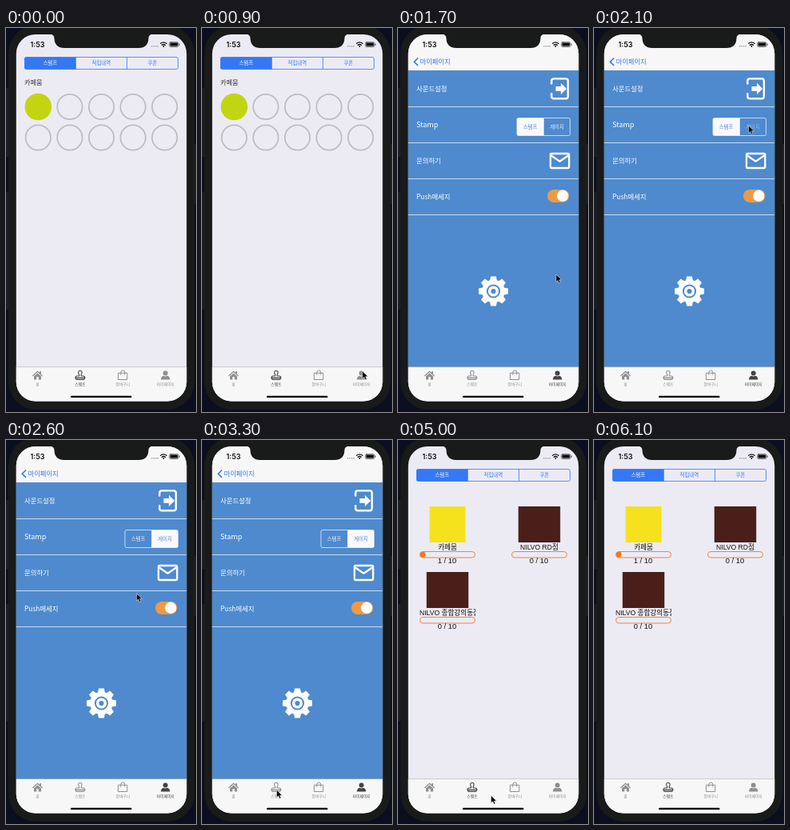
Animation of 238x480 px, one loop 6200 ms. Source, as an HTML page:

```html
<!DOCTYPE html>
<html lang="ko">
<head>
<meta charset="utf-8">
<title>Stamp app</title>
<style>
html, body { margin: 0; width: 100%; height: 100%; overflow: hidden; background: #0b0e1e; }
svg { display: block; width: 238px; height: 480px; }
text { font-family: "Noto Sans CJK KR", "Noto Sans CJK", "Noto Sans", sans-serif; }
.latin { font-family: "Liberation Sans", "Noto Sans CJK KR", sans-serif; }
.mid { text-anchor: middle; }
.line { fill: none; stroke: currentColor; stroke-linejoin: round; stroke-linecap: round; }
</style>
</head>
<body>
<svg viewBox="0 0 238 480">
  <defs>
    <clipPath id="screen"><rect x="12.800" y="8" width="213.400" height="458.600" rx="24"/></clipPath>
    <clipPath id="label"><rect x="27" y="208" width="70" height="14"/></clipPath>
  </defs>

  <rect width="238" height="480" fill="#0b0e1e"/>
  <path d="M0 75h4v86H0zM0 205h4v147H0zM234 145h4v75h-4z" fill="#1b1e29"/>
  <rect x="3" y="-3" width="233" height="480" rx="34" fill="#191a1a"/>

  <g clip-path="url(#screen)">
    <rect x="12" y="8" width="215" height="460" fill="#ecebf4"/>

    <g id="stampTop"></g>
    <g id="stamps"></g>
    <g id="gauges"></g>

    <g id="settings">
      <rect x="12" y="8" width="215" height="45" fill="#f7f7f8"/>
      <path d="M25 37.5l-4.7 4.7 4.7 4.7" fill="none" stroke="#3478f6" stroke-width="1.6"/>
      <text x="27.5" y="45.2" font-size="8.3" fill="#3478f6">마이페이지</text>
      <rect x="12" y="53" width="215" height="371" fill="#4e8acd"/>
      <path d="M12 98.5h215M12 143.5h215M12 188.5h215M12 233.5h215" stroke="#c9dcf1"/>
      <g font-size="8.4" fill="#fff">
        <text x="23" y="79">사운드설정</text>
        <text x="23" y="124" font-size="9">Stamp</text>
        <text x="23" y="169">문의하기</text>
        <text x="23" y="214">Push메세지</text>
      </g>
      <g color="#fff">
        <path class="line" stroke-width="2.4" d="M192.3 69.5v-3.3q0-2.8 2.8-2.8h15q2.8 0 2.8 2.8v19.3q0 2.8-2.8 2.8h-15q-2.8 0-2.8-2.8v-3.3"/>
        <path fill="#fff" d="M197.5 73h6.5v-4.3l7.2 7.2-7.2 7.2v-4.3h-6.5z"/>
        <rect class="line" stroke-width="2.3" x="191" y="157" width="23.3" height="18" rx="1.5"/>
        <path class="line" stroke-width="2.3" d="M192 159.5l10.6 7.2 10.6-7.2"/>
      </g>
      <rect x="187" y="202" width="27.5" height="16" rx="8" fill="#ef9a43"/>
      <circle cx="206.3" cy="210.3" r="7.5" fill="#3c6da8" opacity=".3"/>
      <circle cx="206.3" cy="209.8" r="7.2" fill="#fff"/>
      <g id="modeSwitch">
        <path id="left" d="M182.5 112.5h-31.5q-2 0-2 2v18q0 2 2 2h31.5z" fill="#faf8fd"/>
        <path id="right" d="M182.5 112.5h31q2 0 2 2v18q0 2-2 2h-31z" fill="#faf8fd"/>
        <rect x="149" y="112.5" width="66.5" height="22" rx="2" fill="none" stroke="#e4edf8" stroke-width=".8"/>
        <path d="M182.5 112.5v22" stroke="#e4edf8" stroke-width=".8"/>
        <text id="leftText" class="mid" x="165.5" y="126" font-size="6.4">스탬프</text>
        <text id="rightText" class="mid" x="199" y="126" font-size="6.4">게이지</text>
      </g>
      <g id="gear" transform="translate(119.5 329)">
        <circle r="14.3" fill="#fff"/>
        <circle r="7.6" fill="none" stroke="#4e8acd" stroke-width="2"/>
        <circle r="3.1" fill="#4e8acd"/>
      </g>
    </g>

    <rect x="12" y="424" width="215" height="44" fill="#f7f7f8"/>
    <path d="M12 423.7h215" stroke="#bcbcc2" stroke-width=".7"/>
    <g id="tabs"></g>
    <rect x="81" y="459.7" width="76.5" height="2.4" rx="1.2" fill="#050505"/>

    <text x="30.5" y="24" font-size="9" font-weight="600" fill="#111" style="font-family:Inter,sans-serif">1:53</text>
    <path d="M182 22.8h9" stroke="#a0a0a6" stroke-width="1.4" stroke-dasharray="1.4 1.1"/>
    <g color="#111">
      <path class="line" stroke-width="1.3" d="M193.7 19.3q3.7-3 7.4 0M195.3 21.3q2.1-1.6 4.2 0"/>
      <circle cx="197.4" cy="22.9" r=".9"/>
      <rect class="line" x="204.7" y="17.7" width="11.3" height="5.8" rx="1.6" stroke-width=".6"/>
      <rect x="205.6" y="18.6" width="9.5" height="4" rx=".8"/>
      <path d="M217 19.6v2" stroke="#111" stroke-width=".8"/>
    </g>
  </g>
  <path d="M55 7.5Q60.5 8 60.5 13Q61 25 73 25H166Q178 25 178.5 13Q178.5 8 184 7.5Z" fill="#191a1a"/>

  <path id="cursor" d="M0 0v9.3l2.2-2 1.5 3.5 1.7-.7-1.5-3.4h3z" fill="#000" stroke="#fff" stroke-width=".5"/>
</svg>

<script>
const LOOP = 6200, STEP = 100;
const BLUE = '#3478f6';
const $ = id => document.getElementById(id);
const clamp = v => Math.max(0, Math.min(1, v));
const ease = v => v * v * (3 - 2 * v);
const ramp = (t, a, b) => ease(clamp((t - a) / (b - a)));
const show = (id, on) => $(id).setAttribute('display', on ? 'inline' : 'none');
const label = (x, y, size, fill, str, extra = 'class="mid"') =>
  `<text x="${x}" y="${y}" font-size="${size}" fill="${fill}" ${extra}>${str}</text>`;

// Upper segmented control
$('stampTop').innerHTML = `
  <path d="M87.3 36.5H25q-2 0-2 2v11q0 2 2 2h62.3z" fill="${BLUE}"/>
  <rect x="23.5" y="36.5" width="192" height="15" rx="2" fill="none" stroke="${BLUE}" stroke-width=".8"/>
  <path d="M87.3 36.5v15M151.5 36.5v15" stroke="${BLUE}" stroke-width=".8"/>` +
  ['스탬프', '적립내역', '쿠폰'].map((s, i) =>
    label(55.3 + 64 * i, 46.3, 6.4, i ? BLUE : '#fff', s)).join('');

// Stamp card
let card = label(23, 71.3, 8.2, '#333', '카페뭄', 'font-weight="500"');
for (let i = 0; i < 10; i++) {
  const x = 40.3 + 39.6 * (i % 5), y = i < 5 ? 98.5 : 137;
  card += i
    ? `<circle cx="${x}" cy="${y}" r="15.7" fill="none" stroke="#bdbdbf" stroke-width="1.8"/>`
    : `<circle cx="${x}" cy="${y}" r="16.8" fill="#c3d512"/>`;
}
$('stamps').innerHTML = card;

// Shops with progress bars
const shops = [
  { x: 27, y: 83, name: '카페뭄', count: 1, color: '#f5e21c', w: 45 },
  { x: 142, y: 83, name: 'NILVO RD점', count: 0, color: '#4b1f19', w: 52.5 },
  { x: 27, y: 165, name: 'NILVO 종합강의동점', count: 0, color: '#4b1f19', w: 52.5 }
];
$('gauges').innerHTML = shops.map(({ x, y, name, count, color, w }, i) => {
  const mid = x + 35;
  const title = i < 2
    ? label(mid, y + 53.6, 8.6, '#111', name, 'class="mid latin"')
    : `<g clip-path="url(#label)">${label(x, y + 53.6, 8.6, '#111', name, 'class="latin"')}</g>`;
  return `<rect x="${mid - w / 2}" y="${y}" width="${w}" height="45" fill="${color}"/>${title}
    ${count ? `<rect id="fill" x="${x + .5}" y="${y + 56.5}" height="7.5" rx="3.75" fill="#f07a1c"/>` : ''}
    <rect class="bar" x="${x + .5}" y="${y + 56.5}" width="69" height="7.5" rx="3.75" fill="none"/>
    ${label(mid - .5, y + 71.2, 9.4, '#111', count + ' / 10', 'class="mid latin"')}`;
}).join('');
const bars = [...document.querySelectorAll('.bar')];

// Tab bar; icons are drawn around their own centre
const icons = [
  '<path fill="currentColor" d="M-6.5 .5L0-5.5l2.5 2.3v-1.6h2v3.5L6.5 .5l-.8 .9L0-3.8-5.7 1.4zM-4.5 1.5L0-2.6l4.5 4.1v4h-3.2v-3.5h-2.6v3.5h-3.2z"/>',
  '<path class="line" stroke-width="1.1" d="M-1.3 1Q-.9-.6-2-2.2Q-2.8-5.5 0-5.5Q2.8-5.5 2-2.2Q.9-.6 1.3 1H3.8Q6 1 6 3.4H-6Q-6 1-3.8 1zM-5.6 3.4q0 2 1.5 2h8.2q1.5 0 1.5-2"/>',
  '<path class="line" stroke-width="1" d="M-5.5-2.7h11v8.2h-11zM-2.5-.8v-2.2q0-3 2.5-3t2.5 3v2.2"/>',
  '<circle cy="-2.6" r="3" fill="currentColor"/><path fill="currentColor" d="M-5.7 5.5Q-5.7 1.5-2 .8Q0 2 2 .8Q5.7 1.5 5.7 5.5z"/>'
];
$('tabs').innerHTML = ['홈', '스탬프', '장바구니', '마이페이지'].map((s, i) =>
  `<g class="tab" transform="translate(${39.5 + 53.4 * i} 434)">${icons[i]}${label(0, 13.2, 4.8, 'currentColor', s)}</g>`).join('');
const tabs = [...document.querySelectorAll('.tab')];

for (let i = 0; i < 8; i++)
  $('gear').insertAdjacentHTML('afterbegin',
    `<path d="M-4.7-12l1.3-6.5h6.8l1.3 6.5z" fill="#fff" transform="rotate(${i * 45})"/>`);

// Pointer stops: time, x, y
const stops = [
  [400, 247, 456], [900, 201, 429], [1400, 201, 429], [2100, 193.5, 122],
  [2500, 193.5, 122], [2800, 78, 391], [2900, 78, 391], [3300, 93.5, 437.5],
  [4900, 93.5, 437.5], [5300, 241, 482]
];
function pointer(t) {
  const i = stops.findIndex(s => s[0] > t);
  if (i < 1) return null;
  const [a, x, y] = stops[i - 1], [b, u, v] = stops[i];
  const k = ramp(t, a, b);
  return [x + (u - x) * k, y + (v - y) * k];
}

function draw(t) {
  const onSettings = t >= 1000 && t < 3500;
  show('settings', onSettings);
  show('stampTop', !onSettings);
  show('stamps', t < 1000);
  show('gauges', t >= 3500);
  tabs.forEach((tab, i) =>
    tab.setAttribute('color', i === (onSettings ? 3 : 1) ? '#444' : '#8f8f92'));

  const mode = clamp((t - 2100) / 200);
  const pressed = t === 2100;
  $('left').setAttribute('opacity', 1 - mode);
  $('right').setAttribute('opacity', mode);
  $('leftText').setAttribute('fill', mode < .5 ? '#4e8acd' : '#edf3fb');
  $('rightText').setAttribute('fill', pressed ? '#9cbbe0' : mode < .5 ? '#edf3fb' : '#4e8acd');

  const glow = ramp(t, 3600, 4300);
  bars.forEach(bar =>
    bar.setAttribute('stroke', `rgb(240 ${155 - 22 * glow} ${105 - 50 * glow})`));
  $('fill').setAttribute('width', 7 * ramp(t, 3600, 4500));

  const p = pointer(t);
  show('cursor', p);
  if (p) $('cursor').setAttribute('transform', `translate(${p})`);
}

const start = performance.now();
function tick() {
  const t = (performance.now() - start) % LOOP;
  draw(Math.floor(t / STEP) * STEP);
  requestAnimationFrame(tick);
}
tick();
</script>
</body>
</html>
```
